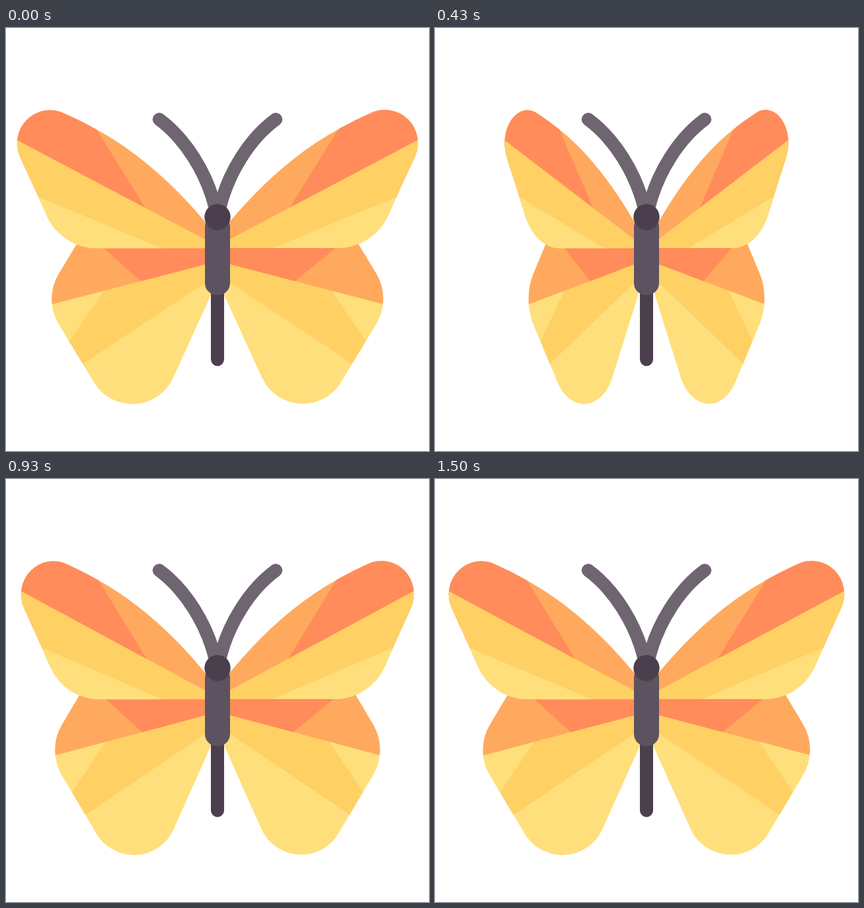
These frames come from a looping animation (640x640 px, 1570 ms). An HTML page:

```html
<!DOCTYPE html>
<html lang="en">
<head>
<meta charset="utf-8">
<title>Butterfly</title>
<style>
  html, body { margin: 0; width: 100%; height: 100%; overflow: hidden; background: #fff; }
  svg { display: block; width: 100vw; height: 100vh; }
  .wing { transform-origin: 338px 0; }
  .coral { fill: #ff8c5a; }
  .orange { fill: #ffa95e; }
  .gold { fill: #ffd064; }
  .cream { fill: #ffdf7c; }
  .feeler { fill: none; stroke: #6f6571; stroke-width: 20; stroke-linecap: round; }
  .dark { fill: #4b3f4e; }
  .body { fill: #5d5360; }
</style>
</head>
<body>
<svg viewBox="0 0 640 640">
  <defs>
    <path id="upperShape" d="M330 302 L340 291 Q418 199 503 153 Q526 140 551 129
      A50 50 0 0 1 618.5 195 L578 284 A84 84 0 0 1 502 333 H330Z"/>
    <path id="lowerShape" d="M330 325 H532 L560.5 372 A74 74 0 0 1 560 448
      L507 536 A68 68 0 0 1 387 529 L330 404Z"/>
    <clipPath id="upperClip"><use href="#upperShape"/></clipPath>
    <clipPath id="lowerClip"><use href="#lowerShape"/></clipPath>

    <g id="lower" clip-path="url(#lowerClip)">
      <use href="#lowerShape" class="cream"/>
      <path class="gold" d="M330 320 H600 L493 398 L558 493 L524 508 L338 385 L330 380Z"/>
      <path class="cream" d="M493 398 L545 474 L600 520 V410Z"/>
      <path class="orange" d="M330 320 H600 V425.5 L338 357 L330 355Z"/>
    </g>
    <g id="upper" clip-path="url(#upperClip)">
      <use href="#upperShape" class="orange"/>
      <path class="coral" d="M515.4 133 L429 272 L500 300 L640 200 V100 H515Z"/>
      <path class="gold" d="M330 324.2 L640 160.5 V340 H330Z"/>
      <path class="cream" d="M404 333 L640 235 V340 H387Z"/>
    </g>
  </defs>

  <g class="wing">
    <use href="#lower"/>
    <path class="coral" d="M330 332 H500 L437 382.9 L330 354.9Z"/>
    <use href="#upper"/>
  </g>
  <g transform="matrix(-1 0 0 1 640 .4)">
    <g class="wing">
      <use href="#lower"/>
      <path class="coral" d="M330 332 H493 L436 382.7 L330 354.9Z"/>
      <use href="#upper"/>
    </g>
  </g>

  <path class="feeler" d="M231.8 138.3 C271 167 304 219 316.5 272"/>
  <path class="feeler" d="M408.2 138.3 C369 167 336 219 323.5 272"/>
  <rect class="dark" x="310" y="380" width="20" height="131.5" rx="10"/>
  <path class="body" d="M301 301 Q301 290 312 290 H328 Q339 290 339 301 V386
    A18 18 0 0 1 321 404 H319 A18 18 0 0 1 301 386Z"/>
  <circle class="dark" cx="320" cy="286" r="19.7"/>
</svg>
<script>
  const LOOP = 1570, STEPS = 22, TICK = 10;
  const wings = document.querySelectorAll('.wing');

  // Fold angle of the wings in degrees: [ms, angle]
  const folds = [[0, 0], [290, 30.7], [430, 46.4], [450, 48.5], [710, 15], [833, 0],
    [930, 11.8], [1140, 42.4], [1195, 50], [1500, 9.6], [LOOP, 0]];

  function foldAt(t) {
    const i = folds.findIndex(([end]) => end > t);
    const [t0, a0] = folds[i - 1], [t1, a1] = folds[i];
    return a0 + (a1 - a0) * (t - t0) / (t1 - t0);
  }

  // Holds each pose for an equal share of the loop, rounded to whole ticks
  function poseTime(t) {
    const middle = (Math.floor(t / TICK) + 0.5) * TICK;
    const step = Math.floor(middle / LOOP * STEPS);
    return Math.round(step * LOOP / STEPS / TICK) * TICK;
  }

  function draw(now) {
    const scale = Math.cos(foldAt(poseTime(now % LOOP)) * Math.PI / 180);
    wings.forEach(w => { w.style.transform = `scaleX(${scale})`; });
    requestAnimationFrame(draw);
  }
  requestAnimationFrame(draw);
</script>
</body>
</html>
```
